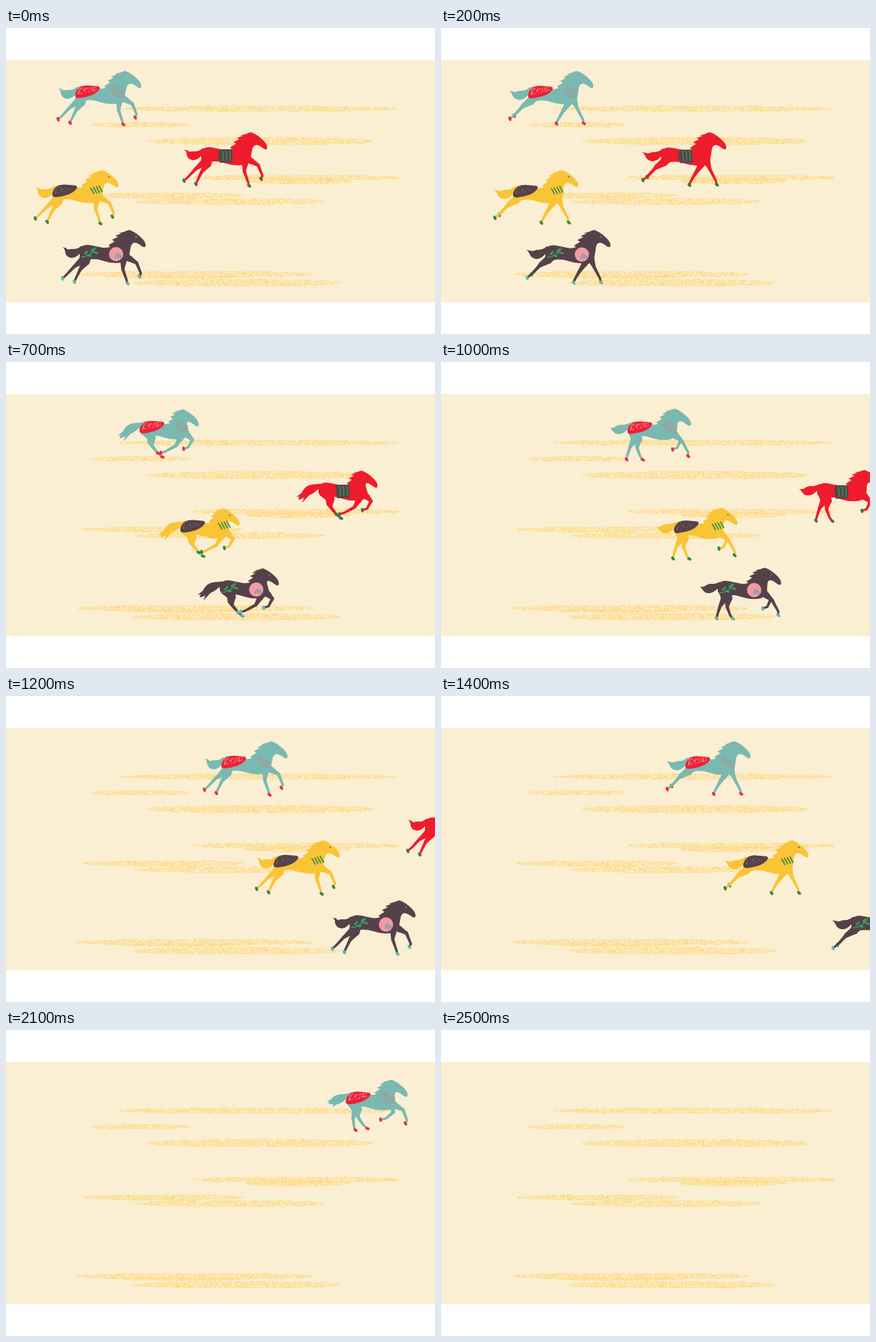
Write an HTML page with a canvas that moves like this. It is 600 px wide and 429 px high and loops after 2.6 s.

```html
<!DOCTYPE html>
<html lang="en">
<head>
<meta charset="utf-8">
<title>Galloping horses</title>
<style>
html, body { margin: 0; width: 100%; height: 100%; overflow: hidden; background: #fff; }
canvas { display: block; width: 100vw; height: 100vh; }
</style>
</head>
<body>
<canvas id="stage" width="600" height="429"></canvas>
<script>
const STEP = 100, FRAMES = 26, STRIDE = 12;
const ctx = document.getElementById('stage').getContext('2d');

// A value that swings once per stride and peaks at the given time.
const swing = (f, mid, amp, peak) => mid + amp * Math.cos((f - peak) / STRIDE * 2 * Math.PI);
const mix = (a, b, t) => Array.isArray(a) ? a.map((v, i) => mix(v, b[i], t)) : a + (b - a) * t;

// Each joint circles on an ellipse; the second leg of a pair does so later.
// Joint: x middle, swing, peak, then the same for y.
const HIND = {
  top: [-8, 4], lag: 1.6, bend: 4, radii: [9, 5.5, 2.3, 1.6, 1.4],
  joints: [[-13, 13, 6.9, 23, 5.5, 8.8], [-14, 23, 6.7, 34, 6.5, 9], [-14, 29, 6.7, 39, 6.5, 9]]
};
const FORE = {
  top: [45, 7], lag: 2.9, bend: 0, radii: [6.5, 4, 2.3, 1.6, 1.4],
  joints: [[46, 17, 8.7, 23, 6.5, 2.2], [43, 26, 9.4, 35, 6.5, 1], [40, 28, 9.7, 38.5, 8, .6]]
};

// x, y and how strongly the point follows the head
const BODY = [
  [-18, -3, 0], [-9, -9, 0], [6, -6, 0], [20, -3, 0], [32, -8, .2], [40, -22, .6],
  [48, -31, 1], [58, -29, 1], [75, -14, 1], [74, -4, 1], [61, -14, 1], [54, -10, .7],
  [53, 5, .1], [47, 17, 0], [26, 18, 0], [6, 11, 0], [-14, 14, 0]
];
const BLANKET = [[-19, 10], [-15, -4], [-5, -9], [6, -8], [20, -7], [12, 3], [-2, 8]];

function random(seed) {
  return () => {
    seed = (seed * 1664525 + 1013904223) >>> 0;
    return seed / 4294967296;
  };
}

function poly(pts, fill) {
  ctx.beginPath();
  pts.forEach(p => ctx.lineTo(p[0], p[1]));
  ctx.fillStyle = fill;
  ctx.fill();
}

function blob(pts, fill) {
  const n = pts.length, mid = i => mix(pts[i % n], pts[(i + 1) % n], .5);
  ctx.beginPath();
  for (let i = 0; i <= n; i++) {
    const [x, y] = pts[i % n], m = mid(i);
    if (i) ctx.quadraticCurveTo(x, y, m[0], m[1]);
    else ctx.moveTo(m[0], m[1]);
  }
  ctx.fillStyle = fill;
  ctx.fill();
}

function oval(x, y, rx, ry, fill, turn = 0) {
  ctx.beginPath();
  ctx.ellipse(x, y, rx, ry, turn, 0, 7);
  ctx.fillStyle = fill;
  ctx.fill();
}
const dot = (x, y, r, fill) => oval(x, y, r, r, fill);

function curve(x, y, cx, cy, ex, ey, color, width = 1) {
  ctx.beginPath();
  ctx.moveTo(x, y);
  ctx.quadraticCurveTo(cx, cy, ex, ey);
  ctx.strokeStyle = color;
  ctx.lineWidth = width;
  ctx.stroke();
}

function limb(pts, radii, fill) {
  pts.forEach(([x, y], i) => {
    const r = radii[i];
    dot(x, y, r, fill);
    if (!i) return;
    const [px, py] = pts[i - 1], s = radii[i - 1], d = Math.hypot(x - px, y - py) || 1;
    const nx = (py - y) / d, ny = (x - px) / d;
    poly([[px + nx * s, py + ny * s], [x + nx * r, y + ny * r],
          [x - nx * r, y - ny * r], [px - nx * s, py - ny * s]], fill);
  });
}

function legs({ top, lag, bend, radii, joints }, f, coat, hoof) {
  for (const t of [f, f - lag]) {
    const [knee, ankle, foot] = joints.map(([x, ax, px, y, ay, py]) =>
      [swing(t, x, ax, px), swing(t, y, ay, py)]);
    const thigh = mix(top, knee, .5);
    thigh[0] += bend;
    limb([top, thigh, knee, ankle, foot], radii, coat);
    oval(...foot, 3.2, 2, hoof, Math.atan2(foot[1] - ankle[1], foot[0] - ankle[0]) / 2);
  }
}

function tail(f, coat) {
  const root = [-14, -3], bend = [-31, swing(f, 6, 6, 1)];
  const tip = [swing(f, -41, 4, 11.5), swing(f, 6, 9, 6.3)];
  const pts = [], radii = [];
  for (let t = 0; t <= 1; t += .1) {
    pts.push(mix(mix(root, bend, t), mix(bend, tip, t), t));
    radii.push(1.2 + 2 * (1 - t) + 4 * Math.sin(Math.PI * t) ** 2);
  }
  limb(pts, radii, coat);
  const [x, y] = pts[6];
  for (let i = 0; i < 3; i++) {
    poly([[x, y - 4], [tip[0] - 4 + i * 4, tip[1] - 2 + i * 4], [x + 3, y + 5]], coat);
  }
}

function mane(hx, hy, coat) {
  const pts = [[50 + hx, -22 + hy]];
  for (let i = 0; i <= 10; i++) {
    const t = i / 10, out = i % 2 * 6, w = 1 - t;
    pts.push([50 - 23 * t + hx * w - out, -29 + 25 * t * t + hy * w + out * .2]);
  }
  pts.push([36, -4]);
  poly(pts, coat);
}

function flecks(colors, n) {
  const rnd = random(9);
  for (let i = 0; i < n; i++) {
    const x = -14 + rnd() * 26;
    dot(x, -6 + rnd() * (11 - (x + 14) * .25), .75, colors[i % colors.length]);
  }
}

function tealTack() {
  blob(BLANKET, '#ee2138');
  flecks(['#f7928c', '#f4a59a'], 38);
  for (let i = 0; i < 3; i++) curve(33 + i * 2, -5 - i * 2, 37 + i * 2, 9 - i * 4, 51, 7 - i * 4, '#c9817c');
}

function redTack() {
  poly([[8, -5], [26, -5], [27, 13], [9, 14], [7, 4]], '#54454a');
  for (let i = 0; i < 3; i++) curve(12 + i * 5, -3, 15 + i * 5, 4, 13 + i * 5, 11, '#3a9a55', 1.3);
}

function yellowTack() {
  blob(BLANKET, '#56414a');
  flecks(['#3a8a50', '#b9596a', '#806a55'], 20);
  for (let i = 0; i < 4; i++) curve(36 + i * 4, -4 - i, 39 + i * 4, 0, 41 + i * 4, 5 - i, '#2f8a4c', 1.6);
}

function blackTack() {
  const green = '#35a562';
  curve(-15, 9, 0, 8, 6, -5, green, 1.3);
  for (let i = 0; i < 4; i++) oval(-8 + i * 4.5, i % 2 ? 9 - i * 2 : 3 - i * 2, 3.6, 1.3, green, i % 2 ? .3 : -.8);
  dot(34, 5, 10, '#f29aa5');
  for (let i = 0; i < 3; i++) curve(33 + i * 4, 11, 33 + i * 3, 6, 37 + i * 2, 4 + i * 2, '#5eaaa4', 1.8);
}

// xs: saddle position at each of the times in MARKS
const MARKS = [0, 2, 7, 10, 14, 18, 24];
const HORSES = [
  { coat: '#7ab9b1', hoof: '#ee2d45', eye: '#c9817c', tack: tealTack, y: 89,
    xs: [114, 139, 204, 278, 359, 411, 574] },
  { coat: '#ee1c2c', hoof: '#3c7a50', eye: '#b51522', tack: redTack, y: 175,
    xs: [290, 325, 454, 543, 663] },
  { coat: '#f9c436', hoof: '#2f8a4c', eye: '#56414a', tack: yellowTack, y: 228,
    xs: [82, 118, 261, 343, 440, 566, 755] },
  { coat: '#56414a', hoof: '#62b8a8', eye: '#a88f94', tack: blackTack, y: 312,
    xs: [120, 163, 316, 404, 591, 780] }
];

function drawHorse({ coat, hoof, eye, tack, xs, y }, f) {
  const i = MARKS.findIndex(m => m >= f);
  if (i < 0 || i >= xs.length) return;
  const a = Math.max(i - 1, 0), b = a + 1;
  const x = mix(xs[a], xs[b], (f - MARKS[a]) / (MARKS[b] - MARKS[a]));
  const hx = swing(f, -4, 5, .5), hy = swing(f, 3.5, 2.5, 7.5);
  ctx.save();
  ctx.translate(x, y + f * .28);
  tail(f, coat);
  legs(HIND, f, coat, hoof);
  legs(FORE, f, coat, hoof);
  blob(BODY.map(([px, py, w]) => [px + hx * w, py + hy * w]), coat);
  mane(hx, hy, coat);
  poly([[48 + hx, -27 + hy], [52 + hx, -31 + hy], [55 + hx, -26 + hy]], coat);
  dot(61 + hx, -21 + hy, .9, eye);
  tack();
  ctx.restore();
}

// Speckled ground streaks: left, right, middle, height
const STREAKS = [
  [157, 547, 113, 8], [120, 258, 135.5, 7], [198, 515, 158.5, 11], [260, 553, 209.5, 8],
  [335, 482, 214.5, 8], [107, 332, 234.5, 8], [180, 446, 243, 9], [99, 430, 345, 9],
  [165, 335, 349, 5], [178, 468, 357, 10]
];

function makeGround() {
  const layer = document.createElement('canvas');
  layer.width = 600;
  layer.height = 429;
  const g = layer.getContext('2d'), rnd = random(41);
  g.fillStyle = '#fff';
  g.fillRect(0, 0, 600, 429);
  g.fillStyle = '#faeed3';
  g.fillRect(0, 45, 600, 339.5);
  g.fillStyle = '#fedb86';
  for (const [l, r, mid, h] of STREAKS) {
    for (let x = l; x < r; x++) {
      const half = h / 2 * Math.pow(Math.sin(Math.PI * (x - l + .5) / (r - l)), .4);
      for (let y = Math.round(mid - half); y < mid + half; y++) {
        if (rnd() < .57) g.fillRect(x, y, 1, 1);
      }
    }
  }
  return layer;
}

const ground = makeGround();
const start = performance.now();

function render() {
  const f = Math.floor((performance.now() - start) / STEP) % FRAMES;
  ctx.drawImage(ground, 0, 0);
  HORSES.forEach(h => drawHorse(h, f));
  requestAnimationFrame(render);
}
render();
</script>
</body>
</html>
```
